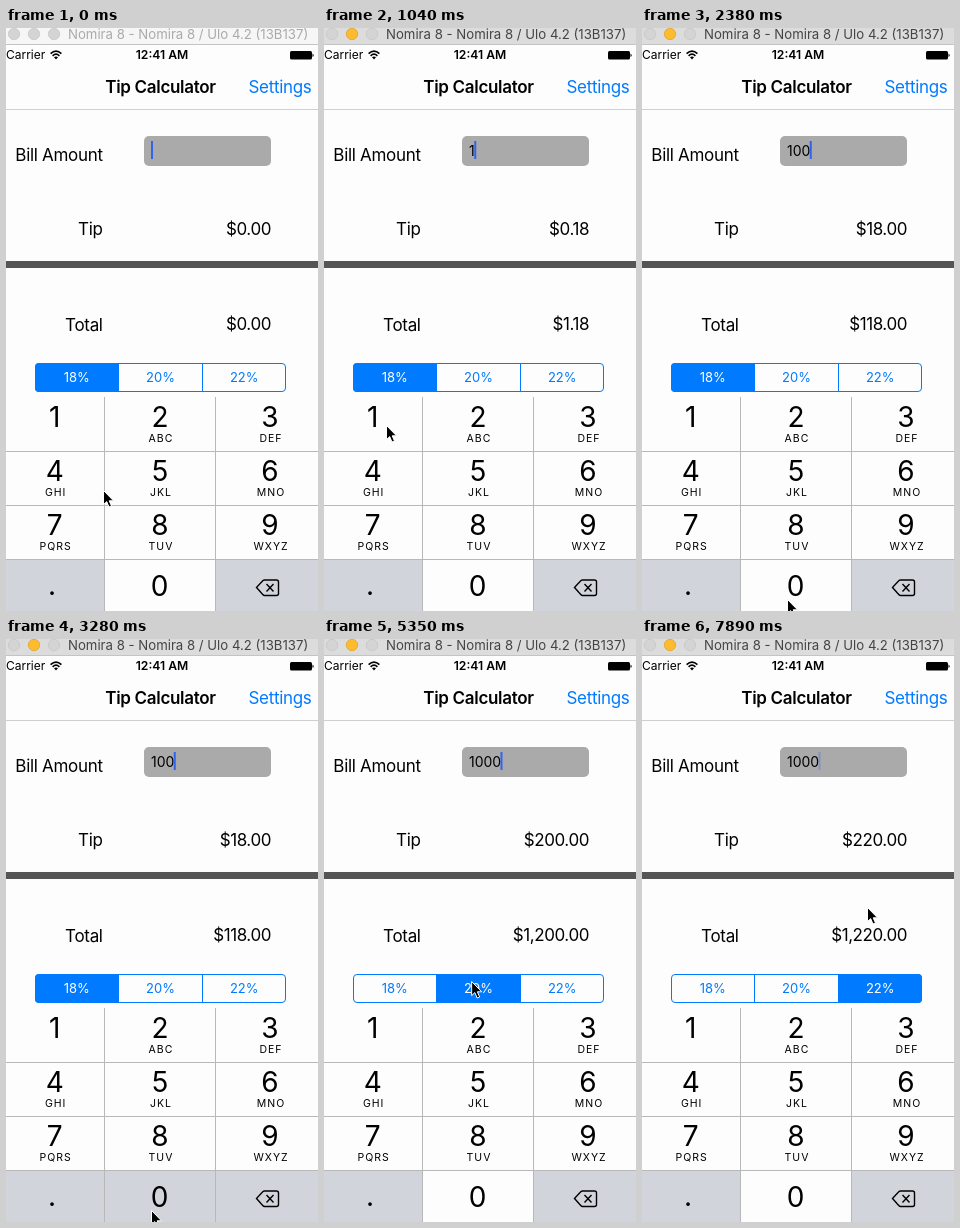
Write an HTML page that moves like this. It is 312 px wide and 583 px high and loops after 8000 ms.

```html
<!DOCTYPE html>
<html lang="en">
<head>
<meta charset="utf-8">
<title>Tip Calculator</title>
<style>
html, body { margin: 0; width: 312px; height: 583px; overflow: hidden; background: #fdfdfd; }
svg { display: block; font: 17px Inter, Roboto, sans-serif; letter-spacing: -.018em; }
.end { text-anchor: end; }
.mid { text-anchor: middle; }
.blue { fill: #007aff; }
.sum { letter-spacing: -.025em; text-anchor: end; }
.seg { font-size: 13px; letter-spacing: 0; text-anchor: middle; }
.digit { font-size: 28px; letter-spacing: 0; text-anchor: middle; }
.sub { font-size: 10.5px; letter-spacing: 1px; text-anchor: middle; }
</style>
</head>
<body>
<svg width="312" height="583" viewBox="0 0 312 583">
  <rect width="312" height="583" fill="#fdfdfd"/>
  <rect id="bar" width="312" height="16"/>
  <path d="M0 16.5H312" stroke="#c4c4c4"/>
  <g id="lights" stroke-width=".7">
    <circle cx="8" cy="6" r="5.7"/><circle cx="28" cy="6" r="5.7"/><circle cx="48" cy="6" r="5.7"/>
  </g>
  <text id="title" x="62" y="11" font-size="13.2" letter-spacing="0">Nomira 8 - Nomira 8 / Ulo 4.2 (13B137)</text>

  <text y="31" font-size="12" letter-spacing="0">Carrier</text>
  <path d="M44.6 25.6Q50 20.6 55.4 25.6M46.6 27.8Q50 24.6 53.4 27.8" fill="none" stroke="#000" stroke-width="1.6"/>
  <path d="M48 29.2Q50 27.6 52 29.2L50 31.5Z"/>
  <text class="mid" x="156" y="31" font-size="12.2" font-weight="600" letter-spacing="0">12:41 AM</text>
  <rect x="284" y="23" width="22" height="8.5" rx="1.5"/>
  <path d="M306.5 25.5Q309 27.3 306.5 29Z"/>

  <text class="mid" x="154.5" y="65" font-weight="600">Tip Calculator</text>
  <text class="end blue" x="305.5" y="65">Settings</text>
  <path d="M0 81.5H312" stroke="#d0d0d0"/>

  <text class="end" x="96.7" y="133">Bill Amount</text>
  <text class="end" x="96.7" y="207">Tip</text>
  <text class="end" x="96.7" y="303">Total</text>
  <rect x="138" y="108" width="127" height="30" rx="5" fill="#aaa"/>
  <text id="bill" x="145" y="128" font-size="14" letter-spacing="0"></text>
  <rect id="caret" y="113" width="2" height="18" fill="#3064f0"/>
  <text id="tip" class="sum" x="265" y="207"></text>
  <text id="total" class="sum" x="265" y="302"></text>
  <rect y="233" width="312" height="7" fill="#555"/>

  <clipPath id="round"><rect x="29" y="335" width="251" height="29" rx="4"/></clipPath>
  <g id="segments" clip-path="url(#round)"></g>
  <rect x="29.5" y="335.5" width="250" height="28" rx="3.5" fill="none" stroke="#007aff"/>
  <path d="M112.5 335V364M196.5 335V364" stroke="#007aff"/>

  <rect id="key1" y="369" width="98" height="54" fill="#d1d5db"/>
  <rect id="key0" x="99" y="532" width="110" height="51" fill="#d1d5db"/>
  <path d="M0 532H98V583H0ZM210 532H312V583H210Z" fill="#d1d5db"/>
  <path d="M0 423.5H312M0 477.5H312M0 531.5H312M98.5 369V583M209.5 369V583" stroke="#b8b8b8" fill="none"/>
  <g id="keys"></g>
  <path d="M250.5 559.5L257 552.5Q257.6 552 258.5 552H270.5Q272.5 552 272.5 554V565.5Q272.5 567.5 270.5 567.5H258.5Q257.6 567.5 257 566.8ZM260.5 556L267.5 563.5M267.5 556L260.5 563.5" fill="none" stroke="#000" stroke-width="1.4"/>

  <path id="mouse" d="M.5 .5V14.6L3.7 11.6 6 17 8.5 16 6.2 10.8H10.5Z" stroke="#fff" stroke-linejoin="round"/>
</svg>
<script>
const $ = id => document.getElementById(id);
const LOOP = 8000, STEP = 149, HOLD = 150, BLINK = 985, WAKE = 730;

// A tap starts at a time, is held for HOLD, and acts on release.
const taps = [
  { time: 870, key: "1" }, { time: 1910, key: "0" }, { time: 2210, key: "0" }, { time: 3250, key: "0" },
  { time: 5040, segment: 1 }, { time: 6670, segment: 2 }
];
// The pointer glides to each place in turn.
const moves = [
  { time: 0, span: 590, x: 62, y: 397 },
  { time: 1040, span: 580, x: 145, y: 571 },
  { time: 3740, span: 420, x: 97, y: 415 },
  { time: 4160, span: 440, x: 147, y: 342 },
  { time: 5340, span: 600, x: 225, y: 347 },
  { time: 7760, span: 100, x: 225, y: 268 }
];
const rates = [18, 20, 22];
const letters = ["", "ABC", "DEF", "GHI", "JKL", "MNO", "PQRS", "TUV", "WXYZ"];

const clamp = v => Math.min(1, Math.max(0, v));
const ease = v => v * v * (3 - 2 * v);
const money = n => "$" + n.toLocaleString("en-US", { minimumFractionDigits: 2, maximumFractionDigits: 2 });
const label = (cls, x, y, s) => `<text class="${cls}" x="${x}" y="${y}">${s}</text>`;

$("keys").innerHTML = letters.map((s, i) => {
  const x = [48.7, 154, 264][i % 3], y = 399 + 54 * Math.floor(i / 3);
  return label("digit", x, y, i + 1) + label("sub", x + 1, y + 15, s);
}).join("") + label("digit", 46, 567, ".") + label("digit", 153.5, 568, "0");

$("segments").innerHTML = rates.map((r, i) => {
  const x = 29 + 83.7 * i;
  return `<rect x="${x}" y="335" width="83.7" height="29" fill="#007aff"/>` + label("seg", x + 41.8, 354, r + "%");
}).join("");
const fills = $("segments").querySelectorAll("rect");
const names = $("segments").querySelectorAll("text");

function pointer(t) {
  let x = 97, y = 462;
  for (const m of moves) {
    const k = ease(clamp((t - m.time) / m.span));
    x += (m.x - x) * k;
    y += (m.y - y) * k;
  }
  return [x, y];
}

function caretOpacity(sinceTyping) {
  const p = sinceTyping % BLINK;
  return p > 895 ? 1 : clamp((600 - p) / 160);
}

function draw(now) {
  const t = Math.floor((now % LOOP + 30) / STEP) * STEP - 9;
  const held = taps.find(a => t >= a.time && t < a.time + HOLD) ?? {};
  const done = taps.filter(a => t >= a.time + HOLD);
  const typed = done.filter(a => a.key);
  const amount = typed.map(a => a.key).join("");
  const picked = done.at(-1)?.segment ?? 0;
  const tip = amount * rates[picked] / 100;

  $("mouse").setAttribute("transform", `translate(${pointer(t)})`);
  $("bill").textContent = amount;
  $("caret").setAttribute("x", amount ? 141.5 + 8.75 * amount.length : 145);
  $("caret").setAttribute("opacity", caretOpacity(typed.length ? t - typed.at(-1).time - HOLD : t + 9));
  $("tip").textContent = money(tip);
  $("total").textContent = money(+amount + tip);

  rates.forEach((_, i) => {
    fills[i].setAttribute("opacity", i === picked ? 1 : i === held.segment ? .15 : 0);
    names[i].setAttribute("fill", i === picked ? "#fff" : "#007aff");
  });
  for (const k of "01") $("key" + k).setAttribute("opacity", +(k === held.key));

  const awake = t > WAKE;
  $("bar").setAttribute("fill", awake ? "#dcdcdc" : "#f6f6f6");
  $("title").setAttribute("fill", awake ? "#444" : "#aaa");
  [...$("lights").children].forEach((c, i) => {
    const yellow = awake && i === 1;
    c.setAttribute("fill", yellow ? "#fdbc2e" : "#d4d4d4");
    c.setAttribute("stroke", yellow ? "#dfa023" : "#c4c4c4");
  });
}

const start = performance.now();
(function tick() {
  draw(performance.now() - start);
  requestAnimationFrame(tick);
})();
</script>
</body>
</html>
```
